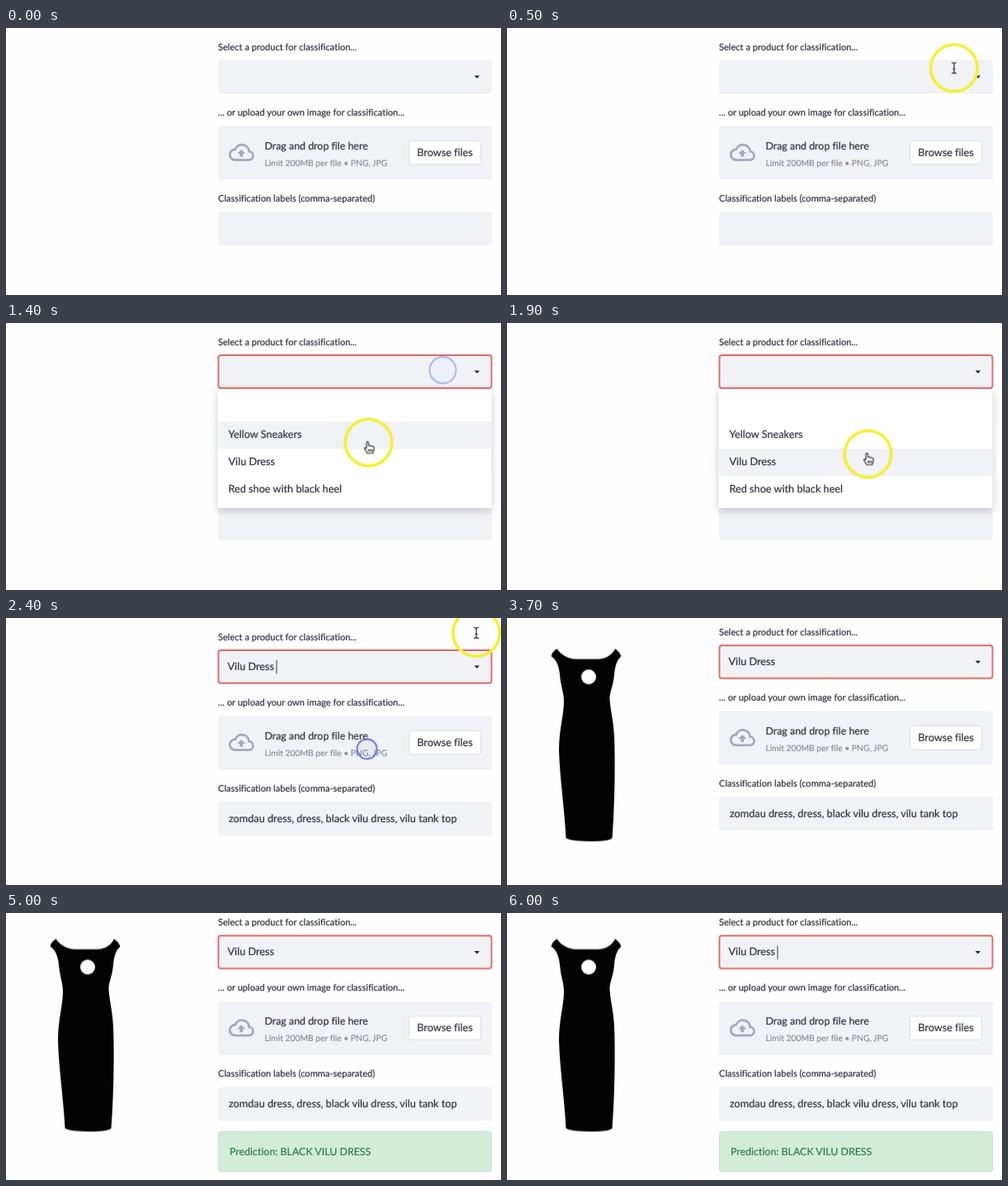
Write an HTML page that moves like this. It is 600x323 px and loops after 7 s.

```html
<!DOCTYPE html>
<html lang="en">
<head>
<meta charset="utf-8">
<title>Product classification demo</title>
<style>
  html, body { margin: 0; width: 100%; height: 100%; overflow: hidden; background: #fefefe; }
  svg { display: block; width: 100%; height: 100%; }
  text {
    font: 12.7px Lato, "Noto Sans", sans-serif; font-variant-ligatures: none;
    fill: #30323d; stroke: #30323d; stroke-width: .2px; text-rendering: geometricPrecision;
  }
  .label { font-size: 11.1px; }
  .title { font-size: 12.4px; }
  .hint { font-size: 10.3px; fill: #8b8d97; stroke: #8b8d97; }
  .verdict { font-size: 12.4px; fill: #2f7a48; stroke: #2f7a48; }
  .field { fill: #f0f2f6; }
  .caret { stroke: #33343c; stroke-width: 1; }
  .click { fill: #6468d812; stroke: #5b5fd6; stroke-width: 2.3; }
  .menu { filter: drop-shadow(0 3px 5px #0003); }

  /* Every track shares one 7 s loop: 1% = 70 ms. */
  .anim { animation: 7s linear infinite; }
  .hard { animation-timing-function: step-end; }
  .page { animation-name: page; }
  .focus { animation-name: focus; }
  .menu { animation-name: menu; }
  .row { animation-name: row; }
  .caret.empty { animation-name: caret-empty; }
  .caret.filled { animation-name: caret-filled; }
  .choice { animation-name: choice; }
  .tags { animation-name: tags; }
  .dress { animation-name: dress; }
  .result { animation-name: result; }
  .pointer { animation-name: pointer; animation-timing-function: ease-in-out; }
  .halo { animation-name: halo; }
  .beam { animation-name: beam; }
  .hand { animation-name: hand; }
  .click.first { animation-name: click-first; }
  .click.second { animation-name: click-second; }

  @keyframes page {
    0% { transform: none; }
    35.7% { transform: translateY(-5.8px); }
    54.2%, 100% { transform: translateY(-11.6px); }
  }
  @keyframes focus { 0% { opacity: 0; } 11.4%, 100% { opacity: 1; } }
  @keyframes menu {
    0%, 11.4% { opacity: 0; }
    12.8% { opacity: .88; }
    14.2%, 30% { opacity: 1; }
    31.4%, 100% { opacity: 0; }
  }
  @keyframes row {
    0% { transform: none; }
    18.5% { transform: translateY(33px); }
    21.4%, 100% { transform: translateY(66px); }
  }
  @keyframes caret-empty { 0% { opacity: 0; } 11.4% { opacity: 1; } 18.5%, 100% { opacity: 0; } }
  @keyframes caret-filled {
    0%, 37.1%, 51.4%, 65.7%, 80% { opacity: 0; }
    31.4%, 44.2%, 58.5%, 72.8%, 85.7%, 100% { opacity: 1; }
  }
  @keyframes choice { 0% { opacity: 0; } 31.4%, 100% { opacity: 1; } }
  @keyframes tags { 0% { opacity: 0; } 32.8%, 100% { opacity: 1; } }
  @keyframes dress { 0% { opacity: 0; } 35.7%, 100% { opacity: 1; } }
  @keyframes result { 0%, 53.5% { opacity: 0; } 55.6%, 100% { opacity: 1; } }
  @keyframes pointer {
    0%, 2.4% { transform: translate(640px, -20px); }
    8.6%, 15.7% { transform: translate(529.5px, 57px); }
    20% { transform: translate(439.5px, 144.5px); }
    22.9% { transform: translate(437px, 180px); }
    25.7%, 31.4% { transform: translate(437.5px, 158.5px); }
    34.28% { transform: translate(570px, 18px); }
    36.4%, 100% { transform: translate(640px, -30px); }
  }
  @keyframes halo {
    0% { opacity: 1; }
    10% { opacity: 0; }
    15.7% { opacity: 1; }
    28.5% { opacity: 0; }
    31.4%, 100% { opacity: 1; }
  }
  @keyframes beam { 0% { opacity: 1; } 17% { opacity: 0; } 31.4%, 100% { opacity: 1; } }
  @keyframes hand { 0% { opacity: 0; } 17% { opacity: 1; } 31.4%, 100% { opacity: 0; } }
  @keyframes click-first {
    0%, 9.9% { r: 25px; opacity: 0; }
    10% { r: 24px; opacity: .9; }
    12.85% { r: 10px; opacity: 1; }
    20% { r: 16px; opacity: .38; }
    22.8%, 100% { r: 18px; opacity: 0; }
  }
  @keyframes click-second {
    0%, 28.4% { r: 25px; opacity: 0; }
    28.5% { r: 24px; opacity: .9; }
    31.4% { r: 10px; opacity: 1; }
    34.3% { r: 12px; opacity: .75; }
    37.1%, 100% { r: 14px; opacity: 0; }
  }
</style>
</head>
<body>
<svg viewBox="0 0 600 323">
  <g class="page anim hard">
    <g class="dress anim hard">
      <path fill="#030303" d="M60.5 43C66 51 74 55 84 55.500H110C120 55 127 51 131 43Q136 46 138.500 52
        C132 58 131 66 130 74C129 88 124 96 124.500 104C126 124 130.500 132 130.500 166C131 200 130 240 127.500 272
        Q124 276 100 276Q76 275.500 71.500 272C70 240 64 200 63 166C63 140 69 124 69 106C69 96 65 88 64 74
        C63 64 60 56 53.500 52Q55 46 60.500 43Z"/>
      <circle cx="99" cy="77" r="9" fill="#fff"/>
    </g>

    <text class="label" x="257" y="27">Select a product for classification...</text>
    <rect class="field" x="257" y="38.500" width="332" height="41" rx="3"/>
    <rect class="focus anim hard" x="257.500" y="39" width="331" height="39.700" rx="3" fill="none" stroke="#de6b67" stroke-width="1.900"/>
    <path d="M567.500 57.500h6.600l-3.300 3.500z" fill="#262730"/>
    <text class="choice anim hard" x="268.500" y="63">Vilu Dress</text>
    <path class="caret empty anim hard" d="M270.500 51v16"/>
    <path class="caret filled anim hard" d="M328 51v16.500"/>

    <text class="label" x="257" y="106">... or upload your own image for classification...</text>
    <rect class="field" x="257" y="118.500" width="332" height="65" rx="3"/>
    <g transform="translate(270 135.500) scale(1.270)" fill="none" stroke="#a3a8bd" stroke-width="2.200">
      <path d="M6 19h13a4 4 0 0 0 .5-8A7 7 0 0 0 6 9a5 5 0 0 0 0 10z"/>
      <path d="M8 13h2.500v3h3v-3H16l-4-4z" fill="#a3a8bd" stroke="none"/>
    </g>
    <text class="title" x="313.500" y="146.500">Drag and drop file here</text>
    <text class="hint" x="313.500" y="167">Limit 200MB per file • PNG, JPG</text>
    <rect x="488.500" y="136.500" width="87" height="28.500" rx="3" fill="#fff" stroke="#dcdee4"/>
    <text x="532" y="155" text-anchor="middle">Browse files</text>

    <text class="label" x="257" y="210">Classification labels (comma-separated)</text>
    <rect class="field" x="257" y="222" width="332" height="41" rx="3"/>
    <text class="tags anim hard" x="270" y="247">zomdau dress, dress, black vilu dress, vilu tank top</text>

    <g class="result anim">
      <rect x="257.500" y="276" width="331" height="48.500" rx="3" fill="#d3ecda" stroke="#c1e3cb"/>
      <text class="verdict" x="271" y="305">Prediction: BLACK VILU DRESS</text>
    </g>

    <g class="menu anim">
      <rect x="256.500" y="80" width="332" height="144" rx="3" fill="#fff"/>
      <rect class="field row anim hard" x="256.500" y="86" width="332" height="33"/>
      <text x="269.500" y="139">Yellow Sneakers</text>
      <text x="269.500" y="172">Vilu Dress</text>
      <text x="269.500" y="205">Red shoe with black heel</text>
    </g>
  </g>

  <circle class="click first anim" cx="529.500" cy="57"/>
  <circle class="click second anim" cx="437.500" cy="158.500"/>
  <g class="pointer anim">
    <circle class="halo anim hard" r="28.300" fill="none" stroke="#f5ef2f" stroke-width="3.500"/>
    <path class="beam anim hard" d="M-3 -6.500Q0 -6.500 0 -4.500Q0 -6.500 3 -6.500M0 -4.500V4.500M-3 6.500Q0 6.500 0 4.500Q0 6.500 3 6.500M-1.500 1.500h3"
      fill="none" stroke="#222" stroke-width="1.200"/>
    <path class="hand anim hard" d="M-2.500 7V0Q-1.300 -1.800 0 0V4Q1.500 2.800 2.500 4.300Q4 3.400 4.700 5Q6.500 4.500 6.500 6.500V9L5 13H-1.500L-5 7.500Q-4.500 5.500 -2.500 7ZM0 8v3M2 8v3M4 8v3"
      fill="#fff" stroke="#222" stroke-width="1.100" stroke-linejoin="round"/>
  </g>
</svg>
</body>
</html>
```
